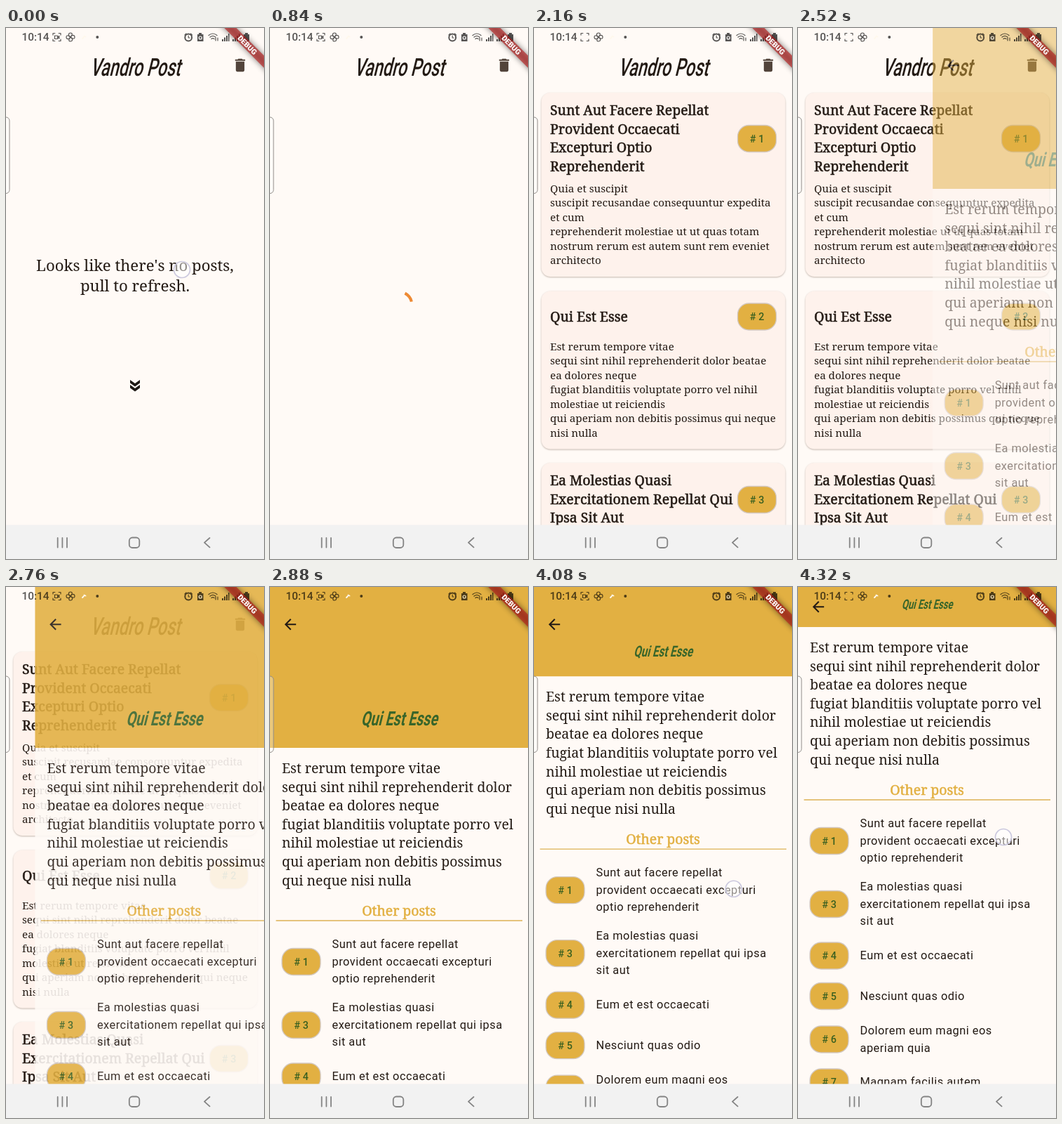
Recreate the animation shown at these times as an HTML page. Size 368 px wide and 756 px high, loop 4440 ms.

```html
<!DOCTYPE html>
<html lang="en">
<head>
<meta charset="utf-8">
<title>Posts app</title>
<style>
  html, body { margin: 0; width: 100%; height: 100%; overflow: hidden; background: #fffaf6; }
  svg { display: block; width: 368px; height: 756px; }
  text { fill: #231a14; white-space: pre; }
  .serif { font-family: "Noto Serif", serif; }
  .sans { font-family: Roboto, sans-serif; }
  .message { font-size: 22.2px; text-anchor: middle; }
  .heading { font-size: 19.45px; stroke: #231a14; stroke-width: .55px; }
  .gold { fill: #e2b042; stroke: #e2b042; text-anchor: middle; }
  .excerpt { font-size: 15.2px; }
  .article { font-size: 19.45px; }
  .row { font-size: 16.35px; letter-spacing: .5px; }
  .tag { font-size: 14.3px; font-weight: 500; letter-spacing: .1px; text-anchor: middle; fill: #3a6020; }
  .display { font-family: Roboto, sans-serif; font-weight: 500; text-anchor: middle; }
  .card { fill: #fef2ec; filter: drop-shadow(0 1px 1px rgba(60, 30, 10, .3)); }
  .line { fill: none; stroke-linecap: round; stroke-linejoin: round; }
</style>
</head>
<body>
<svg viewBox="0 0 368 756" xmlns="http://www.w3.org/2000/svg">
  <defs>
    <clipPath id="body"><rect y="82" width="368" height="626"/></clipPath>
    <clipPath id="screen"><rect width="368" height="708"/></clipPath>
  </defs>

  <rect width="368" height="756" fill="#fffaf6"/>
  <g clip-path="url(#body)">
    <g id="empty">
      <g id="message"></g>
      <path d="M177 501l7 5 7-5v4.5l-7 5-7-5zM177 508l7 5 7-5v4.5l-7 5-7-5z" fill="#1d1814"/>
    </g>
    <g id="puller">
      <circle r="21" fill="#fdf6f6" style="filter:drop-shadow(0 1px 2px rgba(0,0,0,.25))"/>
      <path id="pullArc" fill="none" stroke="#f08a30" stroke-width="2.5"/>
    </g>
    <path id="spinner" transform="translate(184 394)" fill="none" stroke="#ee8a34" stroke-width="4.1"/>
    <g id="cards"></g>
  </g>
  <text class="display" font-size="35" transform="translate(184 68) skewX(-14) scale(.67 1)">Vandro Post</text>
  <path transform="translate(321.7 40.7) scale(1.022)" fill="#52443b"
    d="M6 19c0 1.1.9 2 2 2h8c1.1 0 2-.9 2-2V7H6zM19 4h-3.5l-1-1h-5l-1 1H5v2h14z"/>

  <g clip-path="url(#screen)">
    <g id="detail">
      <rect width="368" height="756" fill="#fffaf6"/>
      <g id="content"></g>
      <rect id="header" width="368" fill="#e2b042"/>
      <text id="headline" class="display" style="font-weight:700;fill:#38652a" font-size="28">Qui Est Esse</text>
      <path id="back" fill="#231a14"
        d="M20 11H7.83l5.59-5.59L12 4l-8 8 8 8 1.41-1.41L7.83 13H20z"/>
    </g>
  </g>

  <rect y="707.5" width="368" height="48.5" fill="#f2f2f2"/>
  <g class="line" stroke="#848484" stroke-width="1.8">
    <path d="M73.7 726v13.5M80.4 726v13.5M87 726v13.5M290.5 726l-7.5 6.7 7.5 6.7"/>
    <rect x="175.8" y="725.5" width="14.5" height="14.5" rx="4.5"/>
  </g>

  <g opacity=".66">
    <text class="sans" x="22.5" y="18" font-size="15.4" style="fill:#000;font-weight:500">10:14</text>
    <g class="line" stroke="#000" stroke-width="1.2">
      <path d="M67 10V7.5h2.8M75.2 7.5H78V10M78 16v2.5h-2.8M69.8 18.5H67V16"/>
      <path id="camera" d="M69.5 11h4v4.5h-4zM73.5 13l2.3-1.5v3.5z"/>
      <g id="pinwheel"></g>
      <path d="M257 8l-2 2M263.5 8l2 2M260.2 11v3h2"/>
      <circle cx="260.2" cy="13.5" r="4.9" stroke-width="2"/>
      <path d="M289 10.5q6-5 12 0M291 13q4-3.3 8 0M293 15.5q2-1.7 4 0M299 18v-4M302 14v4"/>
    </g>
    <path d="M273 9h2V7h4v2h2.5v10H273zM308 19V16h2v3zM311 19v-5.5h2V19zM314 19v-8h2v8zM317 19V8h1.5v11zM323 19v-3h2v3zM326 19v-5.5h2V19zM329 19v-8h2v8zM332 19V8h1.5v11zM339 9h2V7h4v2h2v10h-8z"/>
    <circle cx="277.2" cy="14" r="2" fill="none" stroke="#fff" stroke-width="1.2"/>
    <circle cx="130.3" cy="13" r="2"/>
  </g>
  <path d="M109 15l2-2M111.5 11.5l2 1" class="line" stroke="#fff8ec" stroke-width="1.8"/>

  <rect x="-8" y="127" width="13" height="108.5" rx="5" fill="#fff" fill-opacity=".3" stroke="#8f8c89"/>

  <g transform="translate(344.3 24.3) rotate(45)">
    <rect x="-60" y="-6.1" width="120" height="12.2" opacity=".5" style="filter:blur(4px)"/>
    <rect x="-60" y="-6.1" width="120" height="12.2" fill="#b71c1c" opacity=".63"/>
    <text class="sans" y="3.7" text-anchor="middle" font-size="10.5" style="fill:#fff;font-weight:900">DEBUG</text>
  </g>

  <circle id="touch" r="11.5" fill="#fff" fill-opacity=".5" stroke="#cbc8de" stroke-width="1.7"/>
</svg>

<script>
const LOOP = 4440, STEP = 120;
const el = id => document.getElementById(id);
const clamp = v => Math.max(0, Math.min(1, v));
const set = (id, attrs) => Object.entries(attrs).forEach(([k, v]) => el(id).setAttribute(k, v));
const show = (id, on) => { el(id).style.display = on ? '' : 'none'; };

// Piecewise linear value from [time, value] pairs.
function track(points, t) {
  let [t0, v0] = points[0];
  for (const [t1, v1] of points) {
    if (t < t1) return v0 + (v1 - v0) * clamp((t - t0) / (t1 - t0));
    [t0, v0] = [t1, v1];
  }
  return v0;
}

// cubic-bezier(.4, 0, .2, 1)
function fastOutSlowIn(x) {
  let lo = 0, hi = 1;
  for (let i = 0; i < 24; i++) {
    const s = (lo + hi) / 2, r = 1 - s;
    if (1.2 * r * r * s + .6 * r * s * s + s ** 3 < x) lo = s; else hi = s;
  }
  return 3 * (1 - lo) * lo * lo + lo ** 3;
}

function arc(r, start, sweep) {
  const at = deg => {
    const a = deg * Math.PI / 180;
    return `${r * Math.cos(a)} ${r * Math.sin(a)}`;
  };
  return `M${at(start)}A${r} ${r} 0 ${sweep > 180 ? 1 : 0} 1 ${at(start + sweep)}`;
}

const lines = (cls, x, y, gap, text) => text.split('|').map((s, i) =>
  `<text class="${cls}" x="${x}" y="${y + i * gap}">${s}</text>`).join('');

const tag = (x, cy, n) =>
  `<rect x="${x}" y="${cy - 19}" width="55" height="38" rx="16" fill="#e2b042" stroke="#d3c8c0" stroke-width="1.3"/>
   <text class="sans tag" x="${x + 27.5}" y="${cy + 5}"># ${n}</text>`;

const card = (n, top, height, titleY, title, tagY, bodyY, body) =>
  `<rect class="card" x="10.5" y="${top}" width="348" height="${height}" rx="13"/>` +
  lines('serif heading', 23, titleY, 26.6, title) +
  lines('serif excerpt', 23, bodyY, 20.45, body) + tag(290.5, tagY, n);

const row = (n, cy, text) => {
  const count = text.split('|').length;
  return tag(17, cy, n) + lines('sans row', 88.5, cy + 5.3 - (count - 1) * 12.25, 24.5, text);
};

el('message').innerHTML =
  lines('serif message', 184, 345.5, 29.8, "Looks like there's no posts,|pull to refresh.");

el('cards').innerHTML =
  card(1, 92, 262, 124, 'Sunt Aut Facere Repellat|Provident Occaecati|Excepturi Optio|Reprehenderit', 157.5,
    234, 'Quia et suscipit|suscipit recusandae consequuntur expedita|et cum|reprehenderit molestiae ut ut quas totam|nostrum rerum est autem sunt rem eveniet|architecto') +
  card(2, 374.5, 225, 417.5, 'Qui Est Esse', 411,
    459, 'Est rerum tempore vitae|sequi sint nihil reprehenderit dolor beatae|ea dolores neque|fugiat blanditiis voluptate porro vel nihil|molestiae ut reiciendis|qui aperiam non debitis possimus qui neque|nisi nulla') +
  card(3, 619, 200, 651, 'Ea Molestias Quasi|Exercitationem Repellat Qui|Ipsa Sit Aut', 671.5, 740, '');

el('content').innerHTML =
  lines('serif article', 17, 265, 26.6, 'Est rerum tempore vitae|sequi sint nihil reprehenderit dolor|beatae ea dolores neque|fugiat blanditiis voluptate porro vel|nihil molestiae ut reiciendis|qui aperiam non debitis possimus|qui neque nisi nulla') +
  lines('serif heading gold', 184, 467.5, 0, 'Other posts') +
  '<path d="M8.5 475H360" stroke="#dcb153" stroke-width="1.3"/>' +
  row(1, 533.5, 'Sunt aut facere repellat|provident occaecati excepturi|optio reprehenderit') +
  row(3, 623.5, 'Ea molestias quasi|exercitationem repellat qui ipsa|sit aut') +
  row(4, 697, 'Eum et est occaecati') +
  row(5, 754.5, 'Nesciunt quas odio') +
  row(6, 816, 'Dolorem eum magni eos|aperiam quia') +
  row(7, 877, 'Magnam facilis autem');

el('pinwheel').innerHTML = [0, 90, 180, 270].map(a =>
  `<path transform="translate(92 13) rotate(${a})" d="M0 0C-4-2-3-6 0-6S3-3 0 0"/>`).join('');

function drawTouch(t) {
  const pull = t < 660, tap = t >= 1800 && t < 2040, drag = t >= 3600;
  show('touch', pull || tap || drag);
  if (pull) set('touch', {
    cx: track([[0, 251], [540, 282]], t),
    cy: track([[0, 344], [60, 350], [540, 634]], t)
  });
  else if (tap) set('touch', { cx: 215, cy: 480 });
  else set('touch', {
    cx: track([[3600, 274], [3840, 276.5], [4320, 293]], t),
    cy: track([[3600, 543], [3720, 531], [3840, 503.5], [4320, 356]], t)
  });
}

function drawHome(t) {
  show('empty', t < 700);
  show('cards', t >= 1320);

  const pulled = clamp((t - 60) / 420);
  show('puller', t > 60 && t < 700);
  set('puller', { transform: `translate(184 ${track([[60, 60], [480, 186], [620, 131]], t)})` });
  set('pullArc', { d: arc(9, -90 + 120 * pulled, 5 + 265 * pulled) });

  const age = t - 690, phase = (age % 1333) / 1333;
  show('spinner', age > 0 && t < 1320);
  const head = 270 * fastOutSlowIn(clamp(phase * 2));
  const tail = 270 * fastOutSlowIn(clamp(phase * 2 - 1));
  const turn = age * 360 / 2222 + phase * 90;
  set('spinner', { d: arc(18.4, -97 + turn + tail, Math.max(head - tail, .1)) });
}

function drawDetail(t) {
  const entered = clamp((t - 2240) / 586);
  show('detail', entered > 0);
  set('detail', { transform: `translate(${368 * (1 - entered)} 0)`, opacity: entered });

  // The header shrinks to the toolbar height, then leaves with the list.
  const scroll = track([[3600, 0], [3720, 5], [3840, 31.6], [4320, 172]], t);
  const folded = clamp(scroll / 147), bottom = 229 - scroll, size = 1 - folded / 3;
  set('content', { transform: `translate(0 ${-scroll})` });
  set('header', { height: bottom });
  set('headline', {
    transform: `translate(184 ${bottom - 32 + 6 * folded}) scale(${size}) skewX(-14) scale(.7 1)`
  });
  set('back', { transform: `translate(16.7 ${41 - Math.max(0, scroll - 147)}) scale(1.022)` });
}

function render(now) {
  const t = Math.floor((now % LOOP) / STEP) * STEP;
  drawHome(t);
  drawDetail(t);
  drawTouch(t);
  show('camera', t < 1260 || (t > 2700 && t < 4100));
}

let begin;
function tick(now) {
  begin ??= now;
  render(now - begin);
  requestAnimationFrame(tick);
}
render(0);
requestAnimationFrame(tick);
</script>
</body>
</html>
```
